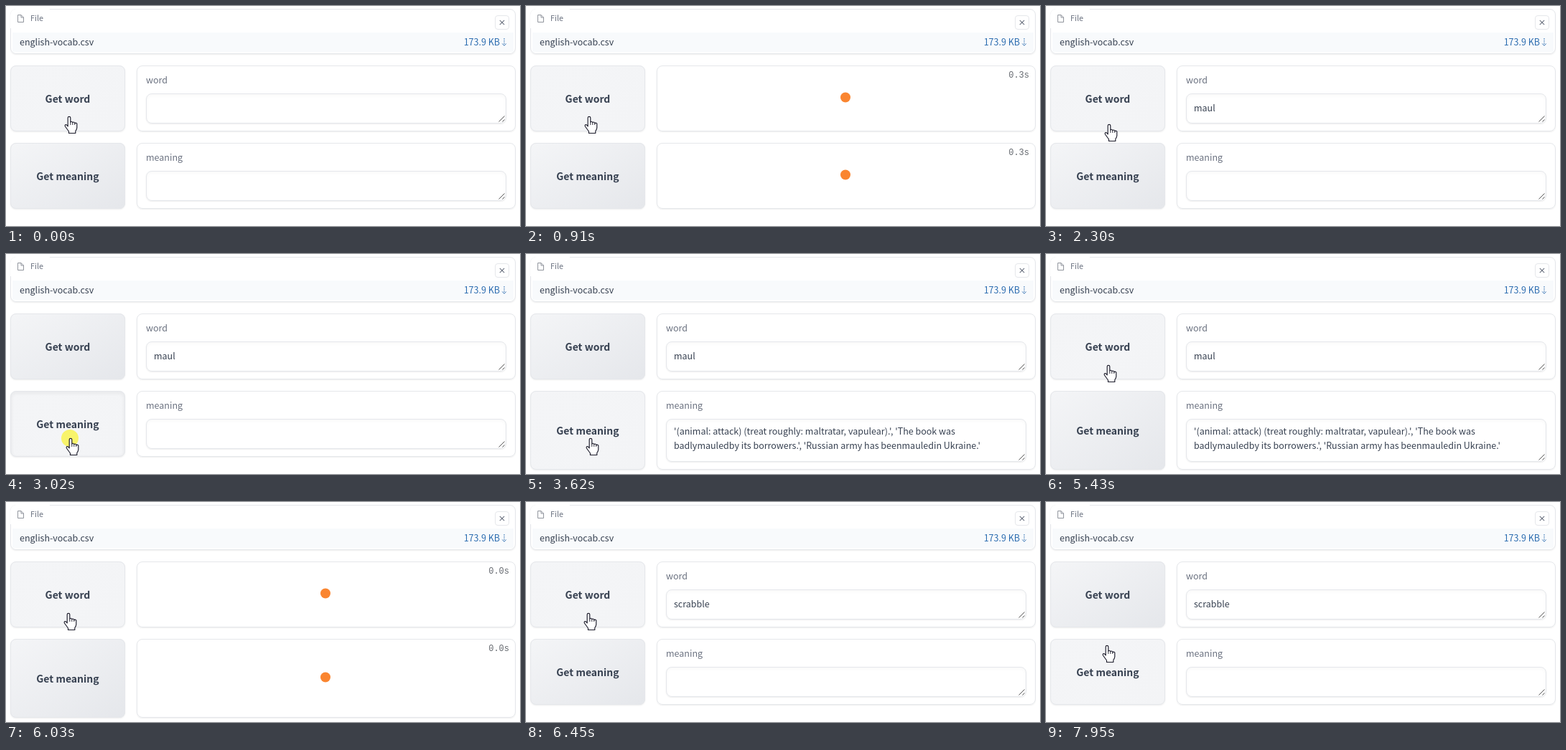
Animation, 716 px wide and 307 px high, one loop 8 s. Source, as an HTML page with a canvas:

```html
<!DOCTYPE html>
<html lang="en">
<head>
<meta charset="utf-8">
<title>Vocabulary trainer</title>
<style>
  html, body { margin: 0; width: 100%; height: 100%; overflow: hidden; background: #fff; }
  canvas { display: block; width: 100vw; height: 100vh; }
</style>
</head>
<body>
<canvas id="stage" width="716" height="307"></canvas>
<script>
const ctx = document.getElementById('stage').getContext('2d');
const LOOP = 8000;
const SANS = '"Noto Sans CJK JP", "Noto Sans CJK SC", "Noto Sans CJK", "Open Sans", sans-serif';
const BODY = `12.5px ${SANS}`;
const SMALL = `10.8px ${SANS}`;
const BOLD = `600 14px ${SANS}`;
const MONO = '12px "Liberation Mono", monospace';
const LINE = '#e5e7eb', GRAY = '#6b7280', INK = '#374151', BLUE = '#2b6cb0';

const MEANING = [
  "'(animal: attack) (treat roughly: maltratar, vapulear).', 'The book was",
  "badlymauledby its borrowers.', 'Russian army has beenmauledin Ukraine.'"
];

// Pointer trips: start, end, number of steps, from, to, easing
const smooth = s => s * s * (3 - 2 * s);
const MOVES = [
  { start: 2300, end: 2720, steps: 5, from: [88, 154], to: [90, 257], ease: smooth },
  { start: 4830, end: 5430, steps: 7, from: [90, 257], to: [87, 155], ease: smooth },
  { start: 7650, end: 7950, steps: 4, from: [87, 155], to: [85, 200], ease: s => s * s }
];

// Clicks: press, loading start, result
const CLICKS = [
  { press: 400, load: 610, done: 1110, both: true },
  { press: 3020, load: 3220, done: 3620, both: false },
  { press: 5830, load: 6030, done: 6450, both: true }
];

function text(str, x, y, font, color, align = 'left') {
  ctx.font = font;
  ctx.fillStyle = color;
  ctx.textAlign = align;
  ctx.fillText(str, x, y);
}

function path(x, y, w, h, r) {
  ctx.beginPath();
  ctx.roundRect(x, y, w, h, r);
}

function line(points, color, width = 1) {
  ctx.beginPath();
  points.forEach(([x, y], i) => i ? ctx.lineTo(x, y) : ctx.moveTo(x, y));
  ctx.strokeStyle = color;
  ctx.lineWidth = width;
  ctx.stroke();
}

// Bordered rounded box; x, y, w, h are its outer edges
function box(x, y, w, h, r, fill, shadow) {
  ctx.save();
  if (shadow) {
    ctx.shadowColor = 'rgba(0,0,0,.07)';
    ctx.shadowBlur = 2;
    ctx.shadowOffsetY = 1;
  }
  path(x, y, w, h, r);
  ctx.fillStyle = fill;
  ctx.fill();
  ctx.restore();
  path(x + .5, y + .5, w - 1, h - 1, r - .5);
  ctx.strokeStyle = LINE;
  ctx.lineWidth = 1;
  ctx.stroke();
}

function innerShadow(x, y, w, h, r, alpha, blur) {
  ctx.save();
  path(x + 1, y + 1, w - 2, h - 2, r - 1);
  ctx.clip();
  ctx.shadowColor = `rgba(0,0,0,${alpha})`;
  ctx.shadowBlur = blur;
  ctx.shadowOffsetY = 2;
  path(x - .5, y - .5, w + 1, h + 1, r);
  ctx.strokeStyle = LINE;
  ctx.lineWidth = 2;
  ctx.stroke();
  ctx.restore();
}

function button(label, y, h, hover, pressed) {
  const x = 6, w = 160, cx = x + w / 2, cy = y + h / 2;
  const k = w * h / (w * w + h * h);
  const fill = ctx.createLinearGradient(cx - h * k, cy - w * k, cx + h * k, cy + w * k);
  fill.addColorStop(0, '#f4f5f7');
  fill.addColorStop(1, hover ? '#f3f4f6' : '#e5e7eb');
  box(x, y, w, h, 8, fill, true);
  if (pressed) innerShadow(x, y, w, h, 8, .12, 5);
  text(label, cx, Math.round(cy + 5.5), BOLD, INK, 'center');
}

function panel(label, y, h, lines, timer) {
  box(182, y, 528, h, 8, '#fff', true);
  if (timer !== null) {
    text(timer.toFixed(1) + 's', 701, y + 17, MONO, '#666a70', 'right');
    ctx.beginPath();
    ctx.arc(445, y + h / 2 - 1.5, 7, 0, Math.PI * 2);
    ctx.fillStyle = '#fa8530';
    ctx.fill();
    return;
  }
  text(label, 195, y + 25, BODY, GRAY);
  const top = y + 39, high = h - 50, bottom = top + high;
  box(195, top, 502, high, 8, '#fff', true);
  innerShadow(195, top, 502, high, 8, .06, 4);
  const first = lines.length > 1 ? top + 22 : top + 25;
  lines.forEach((str, i) => text(str, 206, first + i * 20, BODY, INK));
  line([[686.5, bottom - 2.5], [694.5, bottom - 10.5]], '#555');
  line([[691.5, bottom - 2.5], [694.5, bottom - 5.5]], '#555');
}

function filePanel() {
  box(6, 4, 704, 63, 8, '#fff', true);
  ctx.fillStyle = '#f8fafc';
  ctx.fillRect(9, 37, 698, 27);
  box(6, 4, 55, 27, [8, 0, 8, 0].map(r => r + .5), '#fff');
  line([[21, 12.5], [16.5, 12.5], [16.5, 22.5], [24.5, 22.5], [24.5, 16], [21, 12.5], [21, 16], [24.5, 16]], '#858a92', .9);
  text('File', 34, 21, SMALL, GRAY);
  text('english-vocab.csv', 19, 55, BODY, INK);
  text('173.9 KB', 688, 55, BODY, BLUE, 'right');
  [45, 48, 51].forEach(y => line([[694, y], [694, y + 1.8]], BLUE));
  line([[691.3, 52.5], [694, 55.3], [696.7, 52.5]], BLUE);
  box(681, 13, 20, 20, 4, '#fff');
  line([[687.8, 19.8], [694.2, 26.2]], GRAY, 1.1);
  line([[694.2, 19.8], [687.8, 26.2]], GRAY, 1.1);
}

function outline() {
  ctx.fillStyle = '#fff';
  ctx.fill();
  ctx.strokeStyle = '#1c1c2b';
  ctx.lineWidth = 1.15;
  ctx.lineJoin = 'round';
  ctx.stroke();
}

function hand(x, y) {
  ctx.save();
  ctx.translate(x, y);
  ctx.beginPath();
  ctx.moveTo(-1.8, 14);
  ctx.lineTo(-1.8, 2);
  ctx.quadraticCurveTo(-1.8, .3, 0, .3);
  ctx.quadraticCurveTo(1.8, .3, 1.8, 2);
  ctx.lineTo(1.8, 8);
  for (const [fx, fy] of [[1.8, 7], [4.8, 7.7], [7.8, 8.8]]) {
    ctx.lineTo(fx, fy + 1);
    ctx.quadraticCurveTo(fx + 1.5, fy - .6, fx + 3, fy + 1.4);
  }
  ctx.lineTo(10.8, 16);
  ctx.quadraticCurveTo(10.5, 18.5, 8.8, 20.5);
  ctx.lineTo(8.8, 23.5);
  ctx.lineTo(-.5, 23.5);
  ctx.lineTo(-.5, 21);
  ctx.lineTo(-5.6, 14);
  ctx.quadraticCurveTo(-6.4, 11.8, -4.4, 11.5);
  ctx.quadraticCurveTo(-3, 11.7, -1.8, 14);
  ctx.closePath();
  outline();
  [1.8, 4.8, 7.8].forEach((fx, i) => line([[fx, 8 + i * .8], [fx, 12]], '#1c1c2b', .9));
  ctx.restore();
}

function arrow(x, y) {
  const pts = [[0, 0], [0, 16.5], [3.8, 13], [6.2, 18.6], [8.5, 17.6], [6.1, 12.2], [11.5, 12]];
  ctx.beginPath();
  pts.forEach(([px, py]) => ctx.lineTo(x + px, y + py));
  ctx.closePath();
  outline();
}

function pointer(t) {
  let pos = MOVES[0].from;
  for (const { start, end, steps, from, to, ease } of MOVES) {
    if (t < start) break;
    const gap = (end - start) / (steps - 1);
    const s = ease(Math.min(steps, Math.floor((t - start) / gap + .01) + 1) / steps);
    pos = from.map((a, i) => a + (to[i] - a) * s);
  }
  return pos.map(Math.round);
}

function draw(t) {
  const [px, py] = pointer(t);
  const click = CLICKS.find(c => t >= c.press && t < c.done);
  const pressed = !!click && t < click.press + 200;
  const timer = click && t >= click.load ? Math.floor((t - click.load) / 100 + .01) / 10 : null;
  const word = t < 1110 ? '' : t < 6450 ? 'maul' : 'scrabble';
  const known = t >= 3620 && t < 6450;
  const tall = known ? 110 : 92;
  const overWord = py >= 83 && py < 175;
  const overMeaning = py >= 191 && py < 191 + tall;

  ctx.fillStyle = '#fff';
  ctx.fillRect(0, 0, 716, 307);
  filePanel();
  button('Get word', 83, 92, overWord, pressed && overWord);
  button('Get meaning', 191, tall, overMeaning, pressed && overMeaning);
  panel('word', 83, 92, [word], click && click.both ? timer : null);
  panel('meaning', 191, tall, known ? MEANING : [''], timer);

  if (pressed) {
    ctx.beginPath();
    ctx.arc(px - 1, py, 12, 0, Math.PI * 2);
    ctx.fillStyle = `rgba(250,243,60,${t < click.press + 100 ? .75 : .45})`;
    ctx.fill();
  }
  (overWord || overMeaning ? hand : arrow)(px, py);
}

function frame() {
  draw(performance.now() % LOOP);
  requestAnimationFrame(frame);
}
frame();
</script>
</body>
</html>
```
